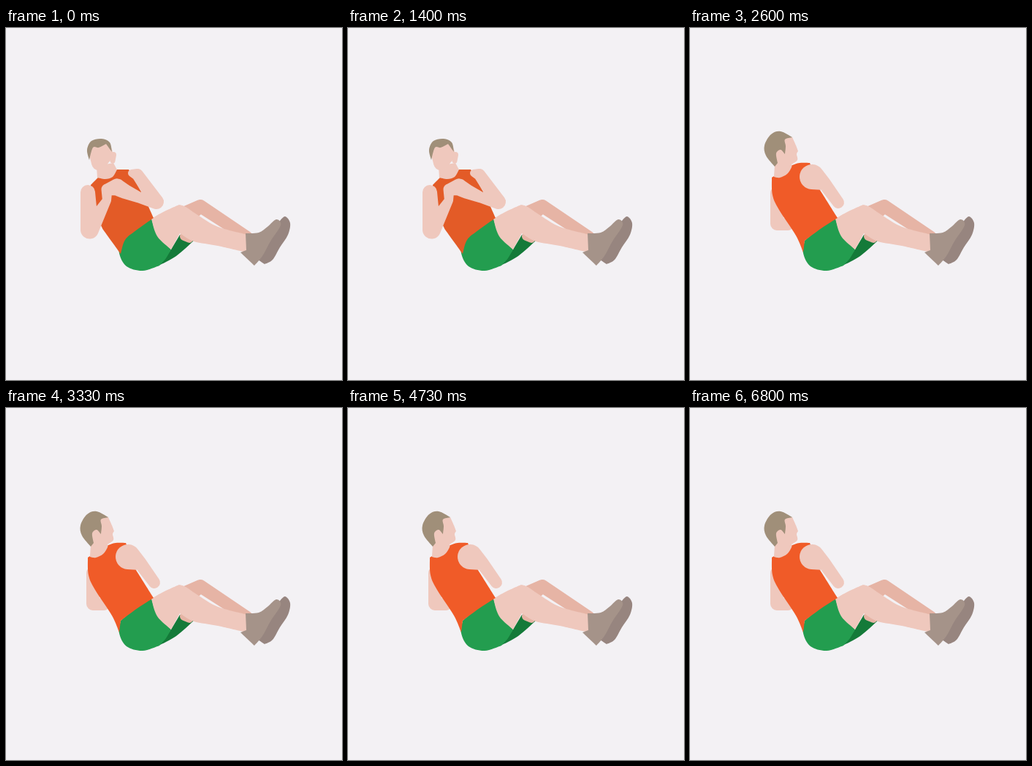
Write an HTML page with a canvas that moves like this. It is 460x480 px and loops after 6.87 s.

```html
<!DOCTYPE html>
<html lang="en">
<head>
<meta charset="utf-8">
<title>Seated twist</title>
<style>
html, body { margin: 0; width: 100%; height: 100%; overflow: hidden; background: #f3f1f4; }
canvas { display: block; width: 460px; height: 480px; }
</style>
</head>
<body>
<canvas id="stage" width="460" height="480"></canvas>
<script>
const ctx = document.getElementById('stage').getContext('2d');
const LOOP = 6870;
// Times at which the torso flips between facing forward and turned away.
const TURNS = [70, 1400, 2600, 3530, 4530, 5530, 6400];

const BG = '#f3f1f4', SKIN = '#efc8bd', SKIN_DARK = '#e6b4a5', HAIR = '#a08f79',
  GREEN = '#239d4f', GREEN_DARK = '#147a39', SHOE = '#a59389', SHOE_DARK = '#97857f',
  FRONT_TOP = '#e35b27', TURNED_TOP = '#f05b28';

function fill(color, path) {
  ctx.fillStyle = color;
  ctx.fill(path);
}

// Tapered limb: joints are [x, y, radius], each pair joined by its tangents.
function limb(color, ...joints) {
  const path = new Path2D();
  joints.slice(1).forEach(([x2, y2, r2], i) => {
    const [x1, y1, r1] = joints[i];
    const dx = x2 - x1, dy = y2 - y1;
    const along = Math.atan2(dy, dx);
    const open = Math.acos((r1 - r2) / Math.hypot(dx, dy));
    const part = new Path2D();
    part.arc(x1, y1, r1, along + open, along - open + 2 * Math.PI);
    part.arc(x2, y2, r2, along - open, along + open);
    part.closePath();
    path.addPath(part);
  });
  fill(color, path);
}

// Outline of smooth runs "x,y x,y ..."; corners fall where runs meet.
function shape(color, ...runs) {
  const path = new Path2D();
  let last = null;
  for (const run of runs) {
    const pts = run.split(' ').map(p => p.split(',').map(Number));
    if (last) pts.unshift(last);
    else path.moveTo(...pts[0]);
    for (let i = 0; i < pts.length - 1; i++) {
      const b = pts[i], c = pts[i + 1];
      const a = pts[i - 1] || b, d = pts[i + 2] || c;
      path.bezierCurveTo(
        b[0] + (c[0] - a[0]) / 6, b[1] + (c[1] - a[1]) / 6,
        c[0] - (d[0] - b[0]) / 6, c[1] - (d[1] - b[1]) / 6,
        c[0], c[1]);
    }
    last = pts[pts.length - 1];
  }
  path.closePath();
  fill(color, path);
}

function drawLegs() {
  limb(SKIN_DARK, [244, 257, 13], [266, 243, 9], [330, 285, 8]);
  shape(SHOE_DARK, '374,264 382,257 389,266 386,282 375,299 365,316 354,322', '345,316');
  shape(GREEN_DARK, '238,282', '257,290', '233,311 209,324', '226,302');
  limb(SKIN_DARK, [244, 284, 6], [251, 288, 5]);
  shape(GREEN, '157,290 178,273 199,259', '207,282 226,302', '219,314 210,324',
    '187,331 165,325 155,307 157,290');
  shape(SKIN, '199,260', '217,250 237,241', '246,244 264,256 290,271 331,282', '329,306',
    '290,297 257,291 238,280', '226,302', '207,284 199,260');
  shape(SHOE, '328,280', '346,279 358,271 370,261 376,269 362,291 351,311 340,324',
    '321,306', '329,303');
}

function drawFront() {
  shape(FRONT_TOP, '116,214', '126,204', '152,193', '168,193', '189,230', '202,259',
    '178,276 163,289 157,308', '133,275', '118,245');
  // neck, face, ear
  shape(SKIN, '124,188', '125,204', '136,206 146,203 152,193', '147,184');
  limb(SKIN, [130, 171, 16], [127, 184, 10]);
  limb(SKIN, [147, 173, 4], [146, 181, 3.5]);
  shape(HAIR, '114,180 111,166 117,154 131,151 142,156 145,169', '137,158',
    '127,163 119,163 114,180');
  // both arms, meeting at the clasped hands
  limb(SKIN, [112, 224, 10], [114.5, 275, 12.5], [138, 235, 6], [138, 220, 7.5],
    [152, 217, 11.5], [163, 223, 10], [182, 231, 7.5], [206, 237, 10],
    [180, 200, 8], [172, 198, 5]);
}

function drawTurned() {
  limb(SKIN, [119, 225, 9], [119, 267, 9], [134, 268, 8]);
  shape(TURNED_TOP, '112,204', '140,187', '150,184 164,184', '178,221', '202,259',
    '180,273 157,290', '155,306', '145,283 122,248 113,228 112,204');
  // face and neck
  shape(SKIN, '125,150', '140,149', '145,160 148,168', '146,172 147,180 139,186',
    '139,190 133,199 123,204 115,203', '117,172');
  shape(HAIR, '116,189 104,174 102,160 111,145 124,141 140,149', '130,152 131,161 130,172',
    '124,166 118,171 120,184');
  limb(SKIN, [167, 203, 17], [184, 212, 9], [203, 238, 8]);
}

function frame() {
  const t = performance.now() % LOOP;
  const turns = TURNS.filter(at => t >= at).length;
  ctx.fillStyle = BG;
  ctx.fillRect(0, 0, 460, 480);
  drawLegs();
  if (turns % 2) drawTurned();
  else drawFront();
  requestAnimationFrame(frame);
}
frame();
</script>
</body>
</html>
```
